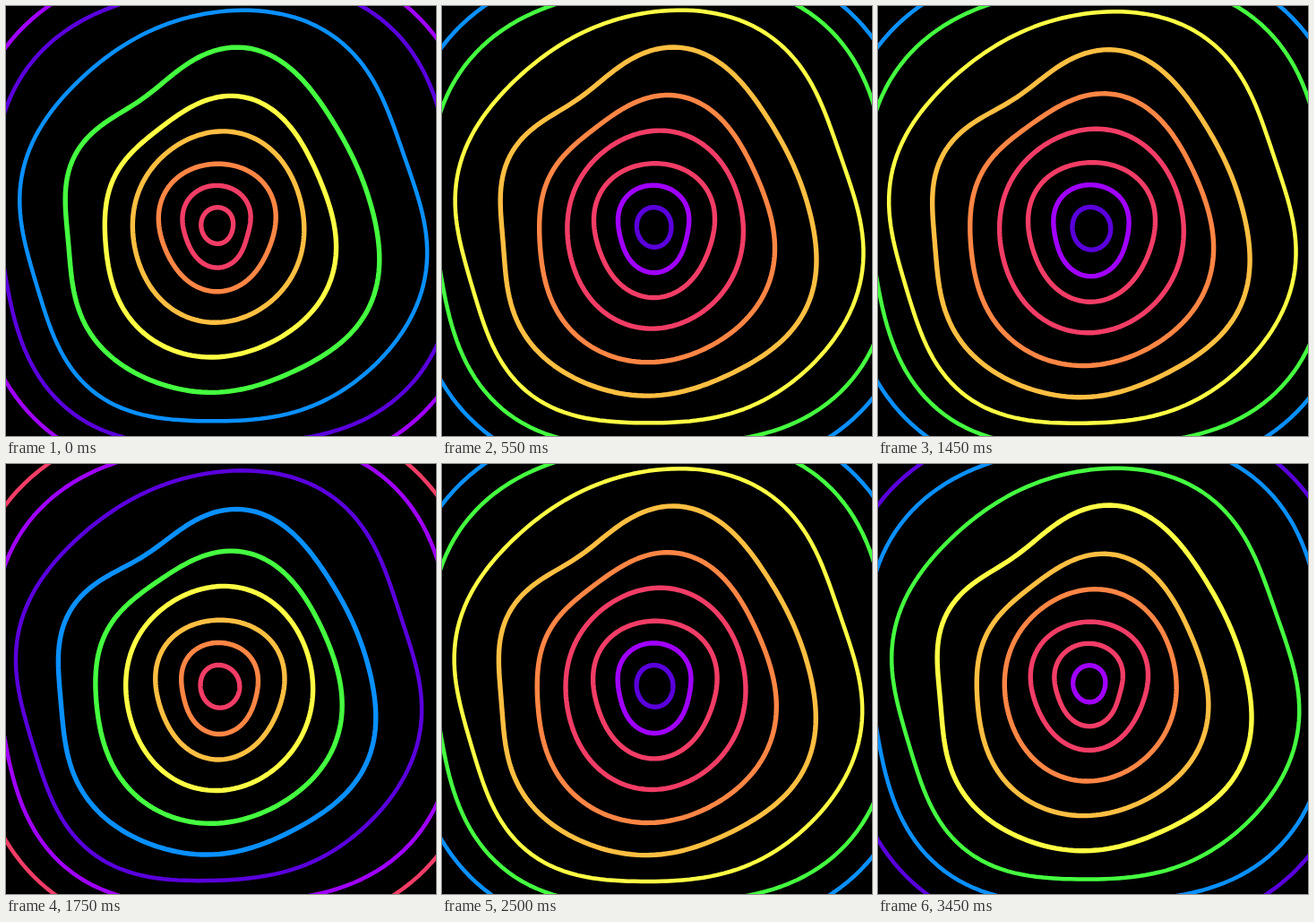
Animation of 480x480 px, one loop 3.5 s. Source, as an HTML page with a canvas:

```html
<!DOCTYPE html>
<html lang="en">
<head>
<meta charset="utf-8">
<title>Rainbow contours</title>
<style>
  html, body { margin: 0; width: 100%; height: 100%; overflow: hidden; background: #000; }
  canvas { display: block; width: 480px; height: 480px; }
</style>
</head>
<body>
<canvas id="stage" width="480" height="480"></canvas>
<script>
const ctx = document.getElementById('stage').getContext('2d');
const SIZE = 480, CENTER = { x: 238, y: 246 };
const STEP_MS = 50, STEPS = 70, SEGMENTS = 180;
const PALETTE = ['#a000ff', '#f23d66', '#f23d66', '#ff8645', '#ffbf42',
                 '#ffff45', '#45ff40', '#0a90ff', '#5a00dc'];
const BASE_RADII = [19, 41.5, 68, 101, 136, 181, 229, 266.5, 300];

const radians = degrees => degrees * Math.PI / 180;
const near = (ring, center, spread) => Math.exp(-(((ring - center) / spread) ** 2));

// A ripple of `order` crests, one facing `direction`, strongest around one ring.
const wave = (order, direction, center, spread, height) => (angle, ring) =>
  height * near(ring, center, spread) * Math.cos(order * (angle - radians(direction)));

// A smooth swelling on one side; `turn` rotates it from ring to ring.
const bulge = (direction, center, spread, height, turn = 0) => (angle, ring) => {
  const facing = Math.cos(angle - radians(direction + turn * ring));
  return height * near(ring, center, spread) * ((1 + facing) / 2) ** 3;
};

const SHAPE = [
  wave(1, 205, 2, 1.8, 3.5),
  wave(1, 85, 5.4, 1.1, 6),
  wave(1, -55, 8.3, 1.7, 15),
  wave(2, 90, 2, 0.9, 3.8),
  wave(2, 95, 5.2, 1.9, 8.2),
  wave(3, -30, 2.7, 1, 2.8),
  wave(3, 35, 6.1, 1.4, 6.5),
  wave(4, 20, 6.3, 1.6, 7),
  wave(4, 42, 8.4, 1.2, 13),
  wave(5, -9, 6, 1, 3.4),
  wave(6, 30, 5.9, 0.7, 2.7),
  wave(6, 8, 7.2, 0.6, 3)
];

// Drifts that settle early, move steadily, or set in late.
const EARLY = [bulge(90, 3.6, 3.2, 11)];
const STEADY = [bulge(18, 3.2, 4, 7.5, -7)];
const LATE = [
  bulge(195, 5.3, 2, 7),
  bulge(15, 6.5, 1, -8),
  bulge(270, 6.3, 0.9, -6)
];

const total = (parts, angle, ring) => parts.reduce((sum, part) => sum + part(angle, ring), 0);

function drawRing(ring, u, color) {
  ctx.beginPath();
  for (let k = 0; k < SEGMENTS; k++) {
    const angle = k / SEGMENTS * Math.PI * 2;
    const radius = BASE_RADII[ring - 1]
      + total(SHAPE, angle, ring)
      + total(EARLY, angle, ring) * u * (2 - u)
      + total(STEADY, angle, ring) * u
      + total(LATE, angle, ring) * u * u;
    ctx.lineTo(CENTER.x + radius * Math.cos(angle), CENTER.y + radius * Math.sin(angle));
  }
  ctx.closePath();
  ctx.lineWidth = ring < 7 ? 5.4 : 4.5;
  ctx.strokeStyle = color;
  ctx.stroke();
}

function draw(time) {
  const step = Math.floor(time / STEP_MS) % STEPS;
  const phase = Math.min(step, STEPS - step);   // out and back
  const count = PALETTE.length;
  ctx.fillStyle = '#000';
  ctx.fillRect(0, 0, SIZE, SIZE);
  for (let ring = 1; ring <= BASE_RADII.length; ring++) {
    const hue = (ring - phase % count + count) % count;
    drawRing(ring, phase / 29, PALETTE[hue]);
  }
}

const start = performance.now();
ctx.lineJoin = 'round';
function tick() {
  draw(performance.now() - start);
  requestAnimationFrame(tick);
}
tick();
</script>
</body>
</html>
```
